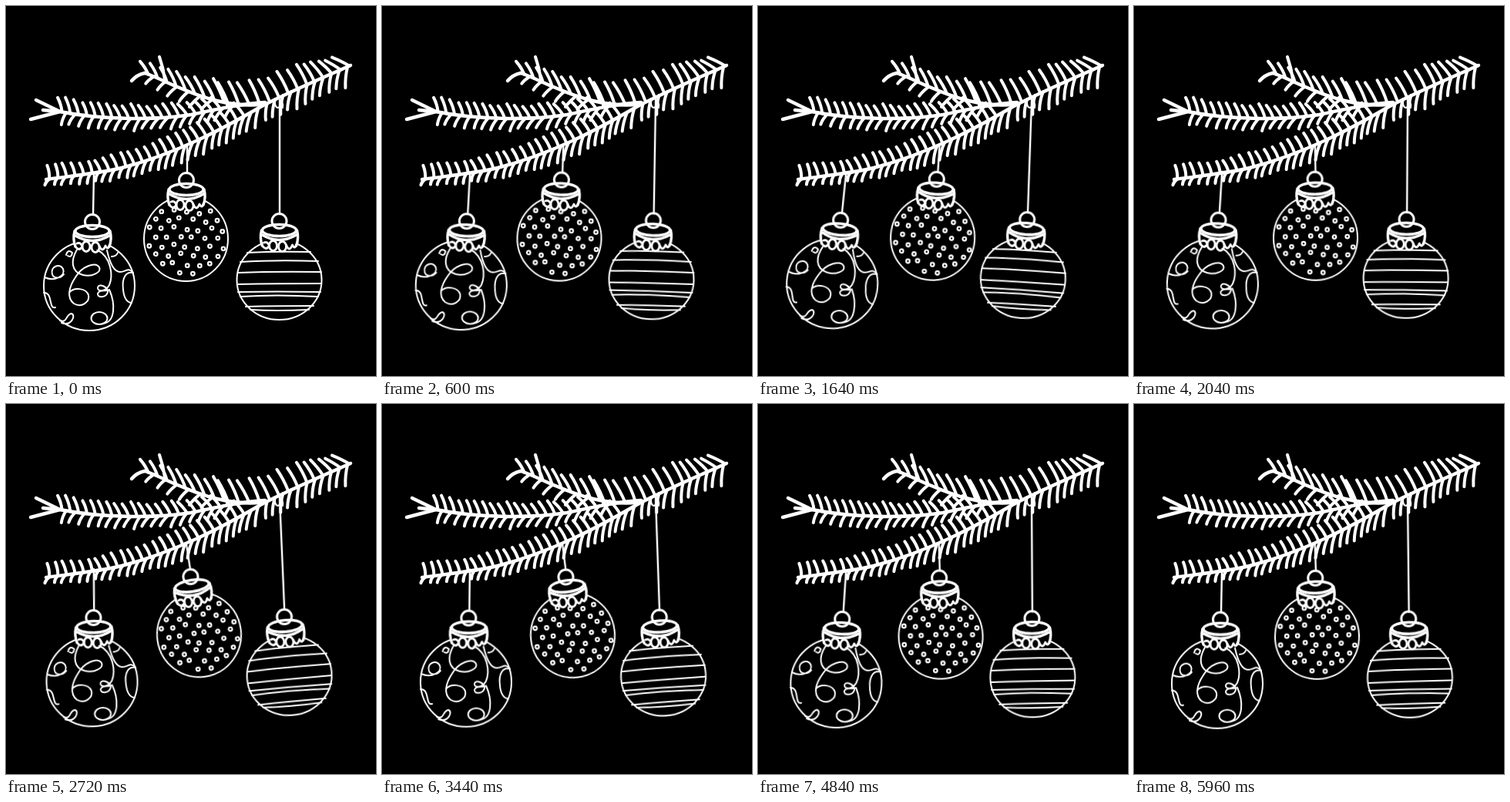
An HTML page that plays this animation: 480x480 px, repeating every 6000 ms.

```html
<!DOCTYPE html>
<html lang="en">
<head>
<meta charset="utf-8">
<title>Swinging baubles</title>
<style>
  html, body { margin: 0; width: 100%; height: 100%; overflow: hidden; background: #000; }
  svg { display: block; width: 100vw; height: 100vh; }
  .ink { fill: none; stroke: #fff; stroke-width: 2; stroke-linecap: round; stroke-linejoin: round; }
  .wood { stroke-width: 4.4; }
  .needles { stroke-width: 4; }
  .string { stroke-width: 2.4; }
  .guide { stroke: none; }

  /* two swings per loop, each turning point with its own lean */
  .swing { animation: swing 6s cubic-bezier(.37, 0, .63, 1) infinite; }
  .left  { transform-origin: 114px 222px; --k: 1;
           --a1: 5.28deg; --a2: -1.63deg; --a3: 3.05deg; --a4: 0deg; }
  .mid   { transform-origin: 235px 190px; --k: .6;
           --a1: 4.5deg; --a2: -9.1deg; --a3: -1.8deg; --a4: -2.05deg; }
  .right { transform-origin: 355px 125px; --k: 1;
           --a1: 2.34deg; --a2: -2.58deg; --a3: -.3deg; --a4: -.65deg; }
  /* the long string bends at the ring: the ball turns twice as far */
  .bend  { transform-origin: 355px 279px; --k: 0; }

  @keyframes swing {
    0%   { transform: translateY(0) rotate(0deg); }
    23%  { transform: translateY(calc(var(--k) * -1.7px)) rotate(var(--a1)); }
    48%  { transform: translateY(calc(var(--k) * -2.9px)) rotate(var(--a2)); }
    75%  { transform: translateY(calc(var(--k) * -.8px)) rotate(var(--a3)); }
    100% { transform: translateY(calc(var(--k) * -.3px)) rotate(var(--a4)); }
  }
</style>
</head>
<body>
<svg viewBox="0 0 480 480">
  <defs>
    <g id="cap">
      <path fill="#000" stroke="none" d="M-23 12 Q0 0 23 12 L22 32 Q0 41 -22 32 Z"/>
      <g stroke-width="3.4">
        <path d="M-23 12 C-25 20 -24 27 -22 32 M23 12 C25 20 24 27 22 32"/>
        <ellipse cy="12" rx="22" ry="7.5"/>
        <path d="M-22 18 Q0 31 22 18"/>
        <circle r="9.5" stroke-width="3"/>
      </g>
      <g stroke-width="2.8">
        <path d="M-22 32 Q-17 39 -13 32 Q-15 26 -20 28"/>
        <ellipse cx="-8" cy="32" rx="5" ry="6.5"/>
        <ellipse cx="4" cy="33" rx="5" ry="6.5"/>
        <path d="M9 31 Q13 41 17 31 Q20 37 22 31"/>
      </g>
    </g>
  </defs>

  <g class="ink">
    <g class="wood">
      <path id="main" d="M447 77 C400 98 360 115 330 131 C280 160 220 192 150 210 C115 218 80 221 52 225"/>
      <path id="middle" d="M336 125 C300 127 270 135 240 141 C190 149 120 147 70 137"/>
      <path id="upper" d="M330 128 C290 131 255 119 225 106 C210 100 195 92 180 87"/>
      <path d="M70 137 L32 147 M70 137 L39 122 M70 137 L48 135 M180 87 Q170 89 163 97"/>
    </g>
    <path id="crest" class="guide" d="M447 77 C400 98 360 115 335 124 C315 128 300 127 285 128"/>
    <path id="needles" class="needles"/>
    <path d="M349 124 q0 8 4 8 q4 -2 2 -10 q5 1 4 10"/>

    <g class="swing left">
      <path class="string" d="M114 217 L113 271"/>
      <ellipse cx="108" cy="363" rx="59" ry="58"/>
      <path d="M50 352 C63 358 78 350 74 341 C70 333 57 338 60 348 C62 354 70 354 75 348"/>
      <path d="M92 316 C84 330 84 345 100 349 C112 352 124 345 121 339 C116 331 98 338 90 352 C82 364 78 378 88 386 C98 392 109 384 107 375 C104 366 88 364 82 372"/>
      <path d="M118 316 C137 326 139 350 134 362 C129 371 118 371 119 365 C121 359 133 365 132 371 C130 379 118 379 119 373 C121 367 130 371 134 368 C142 386 142 410 126 412"/>
      <ellipse cx="121" cy="405" rx="10.5" ry="8"/>
      <path d="M131 317 C135 335 140 345 148 345 C156 345 158 338 165 346 C156 344 150 352 152 368 C153 380 158 385 163 385"/>
      <path d="M49 372 C61 371 55 394 64 391 M72 411 C85 416 91 401 85 399 C77 400 80 412 70 408"/>
      <path d="M78 323 q2 -8 8 -3 q-1 7 -6 4 M137 325 q6 0 8 -5"/>
      <use href="#cap" x="112" y="280"/>
    </g>

    <g class="swing mid">
      <path class="string" d="M235 182 V217"/>
      <ellipse cx="233.5" cy="302" rx="54.5" ry="55"/>
      <path id="dots" stroke-width="2.2"/>
      <use href="#cap" x="234" y="226"/>
    </g>

    <g class="swing right">
      <path class="string" d="M355 122 V270"/>
      <g class="swing bend">
        <ellipse cx="354.5" cy="355.5" rx="55" ry="51.5"/>
        <path d="M313 320 Q350 318 395 319 M304 332 Q350 329 405 331 M301 346 Q350 344 409 345 M301 361 Q350 360 409 360 M301 371 Q350 370 408 371 M304 377 Q350 374 405 377 M311 390 Q350 389 399 389 M317 394 Q350 396 393 394"/>
        <use href="#cap" x="354.5" y="279"/>
      </g>
    </g>
  </g>
</svg>
<script>
  const get = id => document.getElementById(id);
  const mix = (a, b, t) => a + (b - a) * t;
  let seed = 7;
  const jitter = size => {
    seed = (seed * 16807) % 2147483647;
    return (seed / 2147483647 - 0.5) * 2 * size;
  };

  // Needles along a branch; their reach blends from the first vector to the second.
  function needles(id, from, to, count, [x0, y0], [x1, y1]) {
    const branch = get(id), length = branch.getTotalLength();
    let d = '';
    for (let i = 0; i < count; i++) {
      const t = i / (count - 1);
      const p = branch.getPointAtLength(mix(from, to, t) * length);
      const x = mix(x0, x1, t) + jitter(1.5);
      const y = mix(y0, y1, t) * (1 + jitter(0.12));
      const bow = y < 0 ? -2 : 2;
      d += `M${p.x} ${p.y}q${x / 2 - bow} ${y / 2} ${x} ${y}`;
    }
    return d;
  }

  get('needles').setAttribute('d', [
    needles('crest', 0.01, 0.3, 5, [-21, -10], [-14, -22]),
    needles('crest', 0.36, 0.98, 9, [-14, -25], [-14, -28]),
    needles('main', 0.01, 0.28, 11, [-4, 25], [-3, 24]),
    needles('main', 0.36, 0.99, 25, [-13, -18], [-4, -16]),
    needles('main', 0.31, 0.99, 28, [-5, 27], [-5, 8]),
    needles('middle', 0.22, 0.99, 20, [-13, -14], [-5, -20]),
    needles('middle', 0.16, 0.97, 19, [-10, 15], [-7, 14]),
    needles('upper', 0.3, 0.97, 9, [-13, -28], [-9, -19]),
    needles('upper', 0.4, 0.92, 6, [-14, 14], [-11, 9]),
    'M206 95Q204 80 199 66'
  ].join(''));

  let dots = '';
  for (let row = 0; row < 8; row++) {
    for (let col = -4; col <= 4; col++) {
      const x = (col + (row % 2) / 2) * 16 + jitter(2);
      const y = row * 11.6 - 36 + (col % 2) * 2 + jitter(1.5);
      if (Math.hypot(x, y) < 51) {
        dots += `M${233.5 + x - 2.3} ${302 + y}a2.3 2.3 0 1 0 4.6 0a2.3 2.3 0 1 0 -4.6 0`;
      }
    }
  }
  get('dots').setAttribute('d', dots);
</script>
</body>
</html>
```
